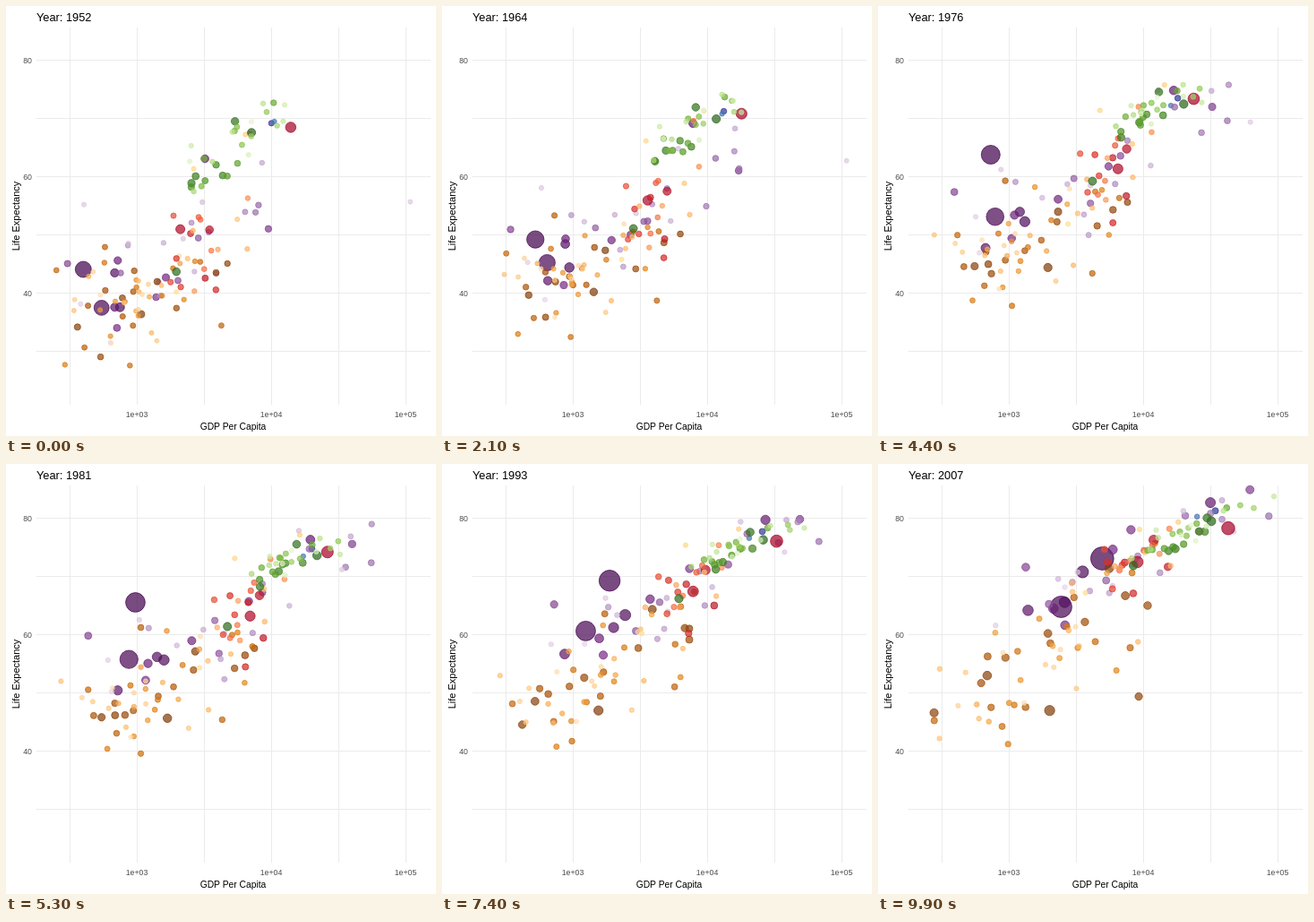
Animation, 480 px wide and 480 px high, one loop 10 s. Source, as an HTML page:

```html
<!DOCTYPE html>
<html lang="en">
<head>
<meta charset="utf-8">
<title>Life expectancy and GDP per capita</title>
<style>
  html, body { margin: 0; width: 100%; height: 100%; overflow: hidden; background: #fff; }
  svg { display: block; width: 100vw; height: 100vh; font-family: "Liberation Sans", Arial, sans-serif; }
  #grid { stroke: #ebebeb; }
  #dots { fill-opacity: .7; stroke-opacity: .7; }
  .tick { font-size: 8.8px; fill: #4d4d4d; }
  .mid { text-anchor: middle; }
  .end { text-anchor: end; }
</style>
</head>
<body>
<svg viewBox="0 0 480 480">
  <path id="grid" fill="none"/>
  <g id="dots"></g>
  <text id="year" x="34" y="17" font-size="12.8">Year: 1952</text>
  <g class="tick end">
    <text x="29" y="64">80</text>
    <text x="29" y="194">60</text>
    <text x="29" y="324">40</text>
  </g>
  <g class="tick mid">
    <text x="146" y="459">1e+03</text>
    <text x="296" y="459">1e+04</text>
    <text x="446" y="459">1e+05</text>
  </g>
  <text class="mid" x="253.5" y="473" font-size="10.3">GDP Per Capita</text>
  <text class="mid" transform="translate(15 234.5) rotate(-90)" font-size="11">Life Expectancy</text>
</svg>
<script>
const SVG = 'http://www.w3.org/2000/svg';
const FRAMES = 100, STEP = 100, FIRST = 1952, LAST = 2007;
const KEY_YEARS = [FIRST, 1980, LAST];
const MAX_POP = 1319;
const dotLayer = document.getElementById('dots');
const yearLabel = document.getElementById('year');
const dots = [];

const mix = (a, b, t) => a + (b - a) * t;
const px = gdp => 146 + 150 * (Math.log10(gdp) - 3);
const py = life => 320 - 6.5 * (life - 40);
const radius = pop => 0.1 + 1.067 * (2 + 10 * Math.sqrt(pop / MAX_POP));

let seed = 7;
function random() {
  seed = (seed + 0x6d2b79f5) | 0;
  let t = Math.imul(seed ^ (seed >>> 15), 1 | seed);
  t = (t + Math.imul(t ^ (t >>> 7), 61 | t)) ^ t;
  return ((t ^ (t >>> 14)) >>> 0) / 2 ** 32;
}
// Bell-shaped noise with unit variance
const noise = () => 2 * (random() + random() + random()) - 3;

let lines = '';
for (let i = 0; i < 6; i++) {
  lines += `M34 ${60.5 + 65 * i}H474`;
  lines += `M${71.5 + 75 * i} 24V445`;
}
document.getElementById('grid').setAttribute('d', lines);

function ramp(hues, t) {
  const at = t * (hues.length - 1);
  const i = Math.min(Math.floor(at), hues.length - 2);
  const part = (hex, k) => parseInt(hex.substr(k * 2, 2), 16);
  const rgb = [0, 1, 2].map(k => Math.round(mix(part(hues[i], k), part(hues[i + 1], k), at - i)));
  return `rgb(${rgb})`;
}

// Path points are [year, gdp, life]; the shade fades with the population rank
function addDot(region, rank, pop, path) {
  const color = ramp(region.hues, rank / (region.count - 1));
  const node = document.createElementNS(SVG, 'circle');
  node.setAttribute('fill', color);
  node.setAttribute('stroke', color);
  dotLayer.append(node);
  const points = path.map(([year, gdp, life]) => ({ year, x: px(gdp), y: py(life) }));
  dots.push({ node, pop, past: region.past, points });
}

// Each state describes the cloud in a key year. A dot keeps most of its
// relative wealth and health from one key year to the next.
function addCrowd(region, from) {
  for (let rank = from; rank < region.count; rank++) {
    let wealth = noise(), health = noise();
    const path = region.states.map((s, k) => {
      if (k) {
        wealth = .9 * wealth + .44 * noise();
        health = .8 * health + .6 * noise();
      }
      const lead = s.spread * wealth;
      return [KEY_YEARS[k], 10 ** (s.gdp + lead), s.life + s.slope * lead + s.scatter * health];
    });
    addDot(region, rank, region.top * Math.exp(-region.decay * rank), path);
  }
}

function addRegion(region, leaders) {
  leaders.forEach(([pop, ...path], rank) => addDot(region, rank, pop, path));
  if (region.states) addCrowd(region, leaders.length);
}

// past: share of the last population at the start; gdp and spread are in decades
const oceania = { count: 2, past: .45, hues: ['313695', '4575b4'] };
const asia = {
  count: 33, past: .4, top: 250, decay: .14,
  hues: ['40004b', '762a83', '9970ab', 'c2a5cf', 'e7d4e8'],
  states: [
    { gdp: 3.2, spread: .38, life: 46.5, slope: 8, scatter: 7 },
    { gdp: 3.6, spread: .52, life: 61, slope: 10, scatter: 5.5 },
    { gdp: 3.8, spread: .5, life: 71, slope: 10, scatter: 3.5 }
  ]
};
const africa = {
  count: 52, past: .27, top: 90, decay: .085,
  hues: ['7f3b08', 'b35806', 'e08214', 'fdb863', 'fee0b6'],
  states: [
    { gdp: 2.98, spread: .29, life: 39, slope: 4, scatter: 4.5 },
    { gdp: 3.14, spread: .36, life: 50, slope: 7, scatter: 5 },
    { gdp: 3.24, spread: .43, life: 55, slope: 11, scatter: 7.5 }
  ]
};
const americas = {
  count: 25, past: .48, top: 60, decay: .14,
  hues: ['a50026', 'd73027', 'f46d43', 'fdae61', 'fee090'],
  states: [
    { gdp: 3.5, spread: .22, life: 52.5, slope: 20, scatter: 6.5 },
    { gdp: 3.78, spread: .22, life: 65.5, slope: 16, scatter: 4 },
    { gdp: 3.9, spread: .27, life: 73.5, slope: 8, scatter: 2.5 }
  ]
};
const europe = {
  count: 30, past: .75, top: 80, decay: .14,
  hues: ['276419', '4d9221', '7fbc41', 'b8e186', 'e6f5d0'],
  states: [
    { gdp: 3.68, spread: .26, life: 64.5, slope: 16, scatter: 2.8 },
    { gdp: 4.11, spread: .21, life: 72.3, slope: 6, scatter: 1.6 },
    { gdp: 4.35, spread: .24, life: 77.6, slope: 9, scatter: 1.1 }
  ]
};

addRegion(oceania, [
  [20, [1952, 10040, 69.1], [1977, 18334, 73.5], [2007, 34435, 81.2]],
  [4, [1952, 10557, 69.4], [1977, 16234, 72.2], [2007, 25185, 80.2]]
]);
addRegion(asia, [
  [1319, [1952, 400, 44], [1957, 576, 50.5], [1962, 488, 44.5], [1967, 613, 58.4],
    [1977, 741, 64], [1987, 1379, 67.3], [1997, 2289, 70.4], [2007, 4959, 73]],
  [1110, [1952, 547, 37.4], [1972, 724, 50.7], [1987, 977, 58.6], [1997, 1459, 61.8], [2007, 2452, 64.7]],
  [224, [1952, 750, 37.5], [1972, 1111, 49.2], [1992, 2383, 62.7], [2007, 3541, 70.7]],
  [169, [1952, 685, 43.4], [1972, 1050, 51.9], [1992, 1972, 60.8], [2007, 2606, 65.5]],
  [150, [1952, 684, 37.5], [1972, 630, 45.3], [1992, 838, 56], [2007, 1391, 64.1]],
  [127, [1952, 3217, 63], [1972, 14779, 73.4], [1992, 26825, 79.4], [2007, 31656, 82.6]]
]);
addDot(asia, 30, 2.5, [[1952, 108382, 55.6], [1972, 109348, 67.7], [1982, 31354, 71.3], [2007, 47307, 77.6]]);
addRegion(africa, [
  [135, [1952, 1077, 36.3], [1977, 1982, 44.5], [1987, 1385, 46.9], [2007, 2014, 46.9]],
  [80, [1952, 1419, 41.9], [1972, 2024, 51.1], [1992, 3795, 63.7], [2007, 5581, 71.3]],
  [77, [1952, 362, 34.1], [1972, 566, 43.5], [1997, 516, 49.4], [2007, 691, 52.9]],
  [65, [1952, 781, 39.1], [1987, 673, 47.4], [1997, 312, 42.6], [2007, 278, 46.5]],
  [44, [1952, 4725, 45], [1972, 7766, 53.7], [1992, 7225, 61.9], [2007, 9270, 49.3]]
]);
addRegion(americas, [
  [301, [1952, 13990, 68.4], [1977, 24073, 73.4], [2007, 42952, 78.2]],
  [190, [1952, 2109, 50.9], [1977, 6660, 61.5], [2007, 9066, 72.4]],
  [109, [1952, 3478, 50.8], [1977, 7675, 65], [2007, 11978, 76.2]]
]);
addRegion(europe, [
  [82, [1952, 7144, 67.5], [1977, 20513, 72.5], [2007, 32170, 79.4]],
  [71, [1952, 1969, 43.6], [1977, 4269, 59.5], [2007, 8458, 71.8]]
]);

function place({ node, pop, past, points }, year, u) {
  const next = points.findIndex((p, i) => i && year <= p.year);
  const a = points[next - 1], b = points[next];
  const t = (year - a.year) / (b.year - a.year);
  node.setAttribute('cx', mix(a.x, b.x, t).toFixed(2));
  node.setAttribute('cy', mix(a.y, b.y, t).toFixed(2));
  node.setAttribute('r', radius(pop * past ** (1 - u)).toFixed(2));
}

let shown = -1;
function tick() {
  const frame = Math.floor(performance.now() / STEP) % FRAMES;
  if (frame !== shown) {
    shown = frame;
    const u = frame / (FRAMES - 1);
    const year = mix(FIRST, LAST, u);
    yearLabel.textContent = 'Year: ' + Math.round(year);
    for (const dot of dots) place(dot, year, u);
  }
  requestAnimationFrame(tick);
}
tick();
</script>
</body>
</html>
```
